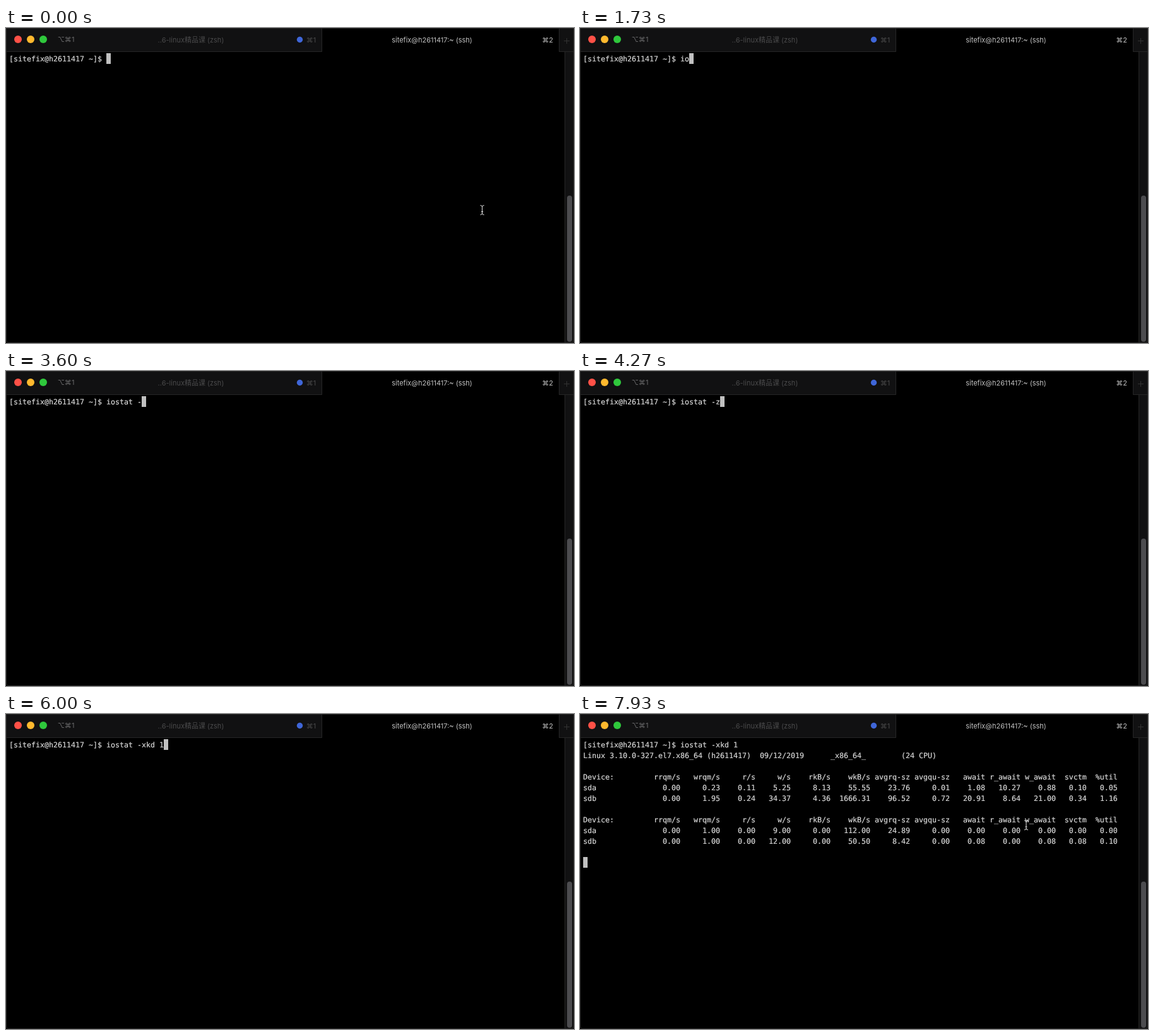
These frames come from a looping animation (900 px wide and 500 px high, 8000 ms). An HTML page:

```html
<!DOCTYPE html>
<html lang="en">
<head>
<meta charset="utf-8">
<title>Terminal</title>
<style>
  html, body { margin: 0; width: 100%; height: 100%; overflow: hidden; background: #000; }
  svg { display: block; width: 100vw; height: 100vh; }
  .bar { fill: #111112; }
  .edge { fill: none; stroke: #262626; }
  .ui { font: 11px Inter, "Noto Sans CJK SC", "Noto Sans CJK", "DejaVu Sans", sans-serif; }
  .mid { text-anchor: middle; }
  .dim { fill: #4a4a4b; }
  .soft { fill: #6c6c6d; }
  .lit { fill: #c0c0c0; }
  #screen text {
    font: 11.64px "DejaVu Sans Mono", monospace;
    fill: #d8d8d8;
    stroke: #d8d8d8;
    stroke-width: .2px;
    text-rendering: geometricPrecision;
    white-space: pre;
  }
</style>
</head>
<body>
<svg viewBox="0 0 900 500">
  <rect width="900" height="500"/>
  <path class="bar" d="M0 0H501V38H0ZM876 0H900V38H876ZM885 38H900V500H885Z"/>
  <path class="edge" d="M.5 0V496Q.5 499.5 4 499.5H896Q899.5 499.5 899.5 496V0M0 .5H900M0 37.5H500.5V0M876.5 0V37.5H900M885.5 38V499"/>
  <rect x="889" y="266" width="8" height="232" rx="4" fill="#4c4c4f"/>

  <circle cx="19" cy="18" r="6" fill="#ff5147"/>
  <circle cx="39" cy="18" r="6" fill="#ffb92e"/>
  <circle cx="59" cy="18" r="6" fill="#2fc83c"/>
  <circle cx="465.5" cy="18.5" r="4.7" fill="#3f66d8"/>
  <g class="ui">
    <text class="soft mid" x="95" y="22">⌥⌘1</text>
    <text class="dim mid" x="293" y="23">..6-linux精品课 (zsh)</text>
    <text class="dim mid" x="483.5" y="23">⌘1</text>
    <text class="lit mid" id="title" x="675" y="23"></text>
    <text class="lit mid" x="858" y="23">⌘2</text>
  </g>
  <path d="M884 20.5H893M888.5 16V25" stroke="#333"/>

  <g id="screen"></g>
  <rect id="cursor" width="7" height="17" fill="#c0c0c0"/>
  <path id="pointer" d="M-3-7.5Q0-7.5 0-5Q0-7.5 3-7.5M0-5V5M-3 7.5Q0 7.5 0 5Q0 7.5 3 7.5M-1.5 2.5H1.5"
        fill="none" stroke="#e4e4e4"/>
</svg>
<script>
const LOOP = 8000, CHAR = 7, LINE = 17, LEFT = 5, TOP = 40;
const user = 'sitefix', host = 'h2611417';
const prompt = `[${user}@${host} ~]$ `;
const $ = id => document.getElementById(id);
$('title').textContent = `${user}@${host}:~ (ssh)`;

const widths = [22, 9, 8, 8, 9, 9, 9, 9, 8, 8, 8, 7, 7];
const row = (name, cells) => name + cells.split(' ')
  .map((cell, i) => cell.padStart(widths[i] - (i ? 0 : name.length))).join('');
const report = (sda, sdb) => [
  row('Device:', 'rrqm/s wrqm/s r/s w/s rkB/s wkB/s avgrq-sz avgqu-sz await r_await w_await svctm %util'),
  row('sda', sda), row('sdb', sdb), ''
];

const banner = [
  `Linux 3.10.0-327.el7.x86_64 (${host})  09/12/2019      _x86_64_        (24 CPU)`, ''
];
const first = report(
  '0.00 0.23 0.11 5.25 8.13 55.55 23.76 0.01 1.08 10.27 0.88 0.10 0.05',
  '0.00 1.95 0.24 34.37 4.36 1666.31 96.52 0.72 20.91 8.64 21.00 0.34 1.16');
const second = report(
  '0.00 1.00 0.00 9.00 0.00 112.00 24.89 0.00 0.00 0.00 0.00 0.00 0.00',
  '0.00 1.00 0.00 12.00 0.00 50.50 8.42 0.00 0.08 0.00 0.08 0.08 0.10');

const typing = [
  [0, ''], [1400, 'i'], [1530, 'io'], [1870, 'ios'], [2000, 'iost'], [2130, 'iosta'],
  [2270, 'iostat'], [2470, 'iostat '], [3530, 'iostat -'], [3930, 'iostat -z'],
  [4600, 'iostat -'], [4800, 'iostat -x'], [5000, 'iostat -xk'], [5200, 'iostat -xkd'],
  [5470, 'iostat -xkd '], [5730, 'iostat -xkd 1']
];
const output = [[6400, [...banner, ...first, '']], [7400, [...banner, ...first, ...second, '']]];
const steps = [
  ...typing.map(([at, text]) => [at, [prompt + text]]),
  ...output.map(([at, lines]) => [at, [prompt + 'iostat -xkd 1', ...lines]])
];

const rows = Array.from({ length: 12 }, (_, i) => {
  const text = document.createElementNS('http://www.w3.org/2000/svg', 'text');
  text.setAttribute('x', LEFT);
  text.setAttribute('y', TOP + 13 + i * LINE);
  return $('screen').appendChild(text);
});

function show(lines) {
  rows.forEach((text, i) => text.textContent = lines[i] || '');
  const last = lines.length - 1;
  $('cursor').setAttribute('x', LEFT + lines[last].length * CHAR);
  $('cursor').setAttribute('y', TOP + last * LINE);
}

// The pointer hides while typing and comes back when the mouse moves.
function movePointer(t) {
  const p = Math.min(1, Math.max(0, (t - 7450) / 400));
  const ease = 1 - (1 - p) ** 3;
  const x = 754.5 - 47.5 * ease, y = 289 - 112.5 * ease;
  $('pointer').setAttribute('transform', `translate(${x} ${y})`);
  $('pointer').style.display = t < 1400 || t >= 7450 ? '' : 'none';
}

let shown;
function draw() {
  const t = performance.now() % LOOP;
  const step = steps.findLast(([at]) => at <= t);
  if (step !== shown) show((shown = step)[1]);
  movePointer(t);
  requestAnimationFrame(draw);
}
draw();
</script>
</body>
</html>
```
